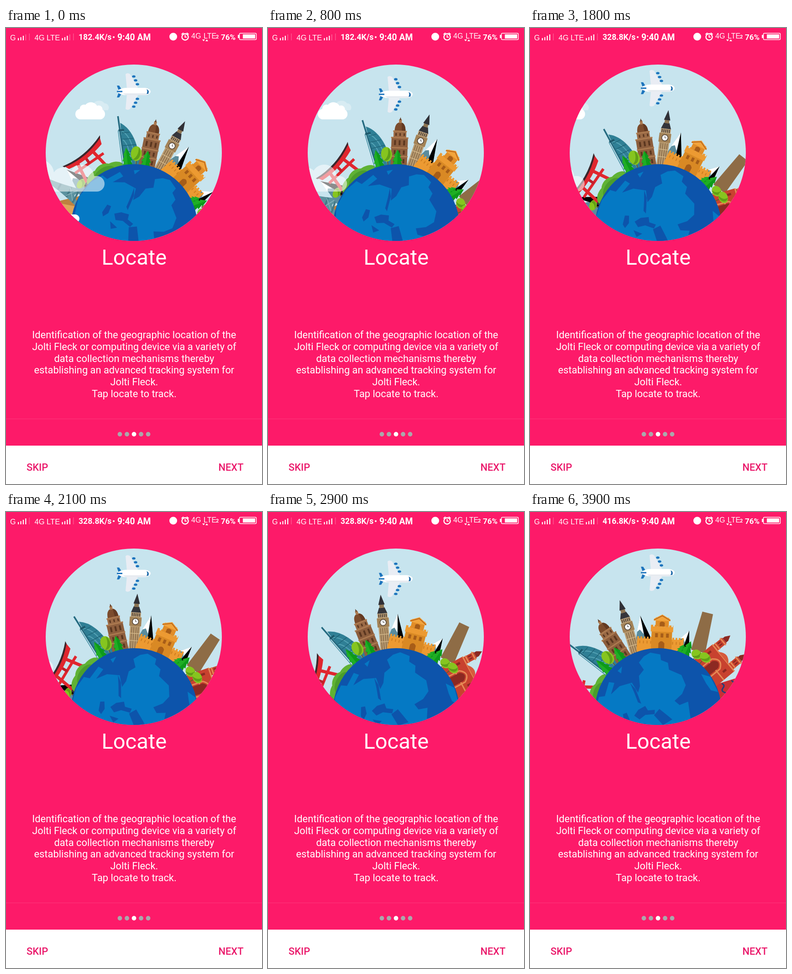
Recreate the animation shown at these times as an HTML page. Size 561 by 998 pixels, loop 4000 ms.

```html
<!DOCTYPE html>
<html lang="en">
<head>
<meta charset="utf-8">
<title>Locate</title>
<style>
html, body { margin: 0; width: 100%; height: 100%; overflow: hidden; background: #fd1a69; }
svg { display: block; width: 561px; height: 998px; }
text { font-family: Roboto, sans-serif; fill: #fff; }
.alt { font-family: "Liberation Sans", Arial, sans-serif; }
.bold { font-weight: 700; }
.btn { font-weight: 500; font-size: 21.9px; fill: #ea186a; }
</style>
</head>
<body>
<svg viewBox="0 0 561 998">
  <defs><clipPath id="disc"><circle cx="280" cy="273" r="193"/></clipPath></defs>
  <rect width="561" height="998" fill="#fd1a69"/>
  <g id="status"></g>
  <g clip-path="url(#disc)">
    <rect x="86" y="79" width="388" height="388" fill="#c7e4ee"/>
    <g id="backClouds" fill="#fff">
      <path d="M185 180a9 9 0 0 1 6-13 14 12 0 0 1 25-2 9 9 0 0 1 7 15z" opacity=".3"/>
      <rect x="152" y="177" width="65" height="23" rx="11.5"/>
      <circle cx="171" cy="177" r="9.5"/>
      <circle cx="186" cy="178" r="15.5"/>
      <circle cx="203" cy="178" r="8.5"/>
    </g>
    <g id="world"></g>
    <g id="frontClouds" fill="#fff">
      <path d="M40 358h159a17 17 0 0 0 0-34h-6a27 27 0 0 0-50-12 25 25 0 0 0-38 4 30 30 0 0 0-65 8z" opacity=".55"/>
      <rect x="60" y="408" width="101" height="19" rx="9.5"/>
    </g>
    <g id="plane"></g>
  </g>
  <g id="page"></g>
</svg>
<script>
const $ = id => document.getElementById(id);
const rect = (x, y, w, h, fill, more = '') => `<rect x="${x}" y="${y}" width="${w}" height="${h}" fill="${fill}" ${more}/>`;
const path = (d, fill, more = '') => `<path d="${d}" fill="${fill}" ${more}/>`;
const oval = (x, y, rx, ry, fill) => `<ellipse cx="${x}" cy="${y}" rx="${rx}" ry="${ry}" fill="${fill}"/>`;
const line = (d, color, w, more = '') => path(d, 'none', `stroke="${color}" stroke-width="${w}" ${more}`);
const text = (x, y, size, s, more = '') => `<text x="${x}" y="${y}" font-size="${size}" ${more}>${s}</text>`;
const dash = s => `stroke-dasharray="${s}"`;
// Stands a shape on the globe: angle from the top, ground at y = 0
const at = (angle, art, dx = 0) => `<g transform="rotate(${angle}) translate(${dx} -139)">${art}</g>`;

const pine = (a, h) => at(a,
  path(`M0 ${-h}L8 ${-h * .55}H5L11 ${-h * .22}H7L13 8H-13L-7 ${-h * .22}H-11L-5 ${-h * .55}H-8Z`, '#1fae24') +
  path(`M0 ${-h}L8 ${-h * .55}H5L11 ${-h * .22}H7L13 8H0Z`, '#0d9a1a'));

const tree = (a, h, rx, ry) => at(a,
  rect(-1, -h, 2, h + 4, '#6d5a2c') + oval(0, -h, rx, ry, '#86c51f') +
  path(`M${rx * .4} ${-h - ry * .9}A${rx} ${ry} 0 0 1 ${-rx * .6} ${-h + ry * .8}Q${rx * .5} ${-h + ry * .3} ${rx * .4} ${-h - ry * .9}`, '#5f9f17'));

const peak = (a, h, left, right) => at(a,
  path(`M0 ${-h}L${-left} 8H${right}Z`, '#5a8c9d') +
  path(`M0 ${-h}L${-left * .42} ${-h * .55}L${-left * .2} ${-h * .6}L0 ${-h * .45}Z`, '#fff') +
  path(`M0 ${-h}L${right} 8H${-right * .25}L1 ${-h * .4}Z`, '#000'));

function torii() {
  const red = '#e0262e';
  return at(-63.5,
    line('M-20-56L-29 4M20-56L29 4', red, 7) +
    line('M-30-2L-29 6M28-2L30 6', '#3a3036', 8) +
    line('M-38-33H38', red, 6) + rect(-3, -48, 6, 16, '#c01f2b') +
    path('M-49-60Q0-45 51-66L46-52Q0-39-44-48Z', red) +
    path('M-52-61Q0-49 54-70L51-65Q0-45-50-57Z', '#3a262c'));
}

function eiffel() {
  return at(-90,
    path('M-1-112H1Q4-50 20 4H10Q0-24-10 4H-20Q-4-50-1-112Z', '#5b929f') +
    line('M-17-6H17M-12-24H12M-7-48H7', '#447987', 4) +
    line('M-13-8L10-26M13-8L-10-26', '#8bb4bd', 1.5));
}

function sail() {
  return at(-33,
    path('M-13-92Q23-70 24 6H-12Z', '#2f7f95') +
    line('M-11-74Q12-60 14 0M-11-56Q3-44 5 0', '#55a3b5', 2) +
    line('M-12-14H22M-12-28H21M-12-42H18M-12-56H13M-12-70H5', '#1f6478', 1.5) +
    line('M-17-107L-10 4', '#246a80', 3.5) +
    rect(-18, -78, 12, 4, '#1d586b') + line('M-19-76L-15 0', '#3d8ba0', 1.5));
}

function dome() {
  const dark = '#5b3720', pale = '#ac7a50';
  return at(-17.2,
    rect(-18, -58, 36, 66, '#8d5e3d') + rect(-14, -72, 28, 15, '#9a6a46') +
    path('M-12-72Q-12-91 0-92Q12-91 12-72Z', '#7c4c2d') +
    path('M3-91Q12-88 12-72H4Z', '#643a22') +
    rect(-3, -98, 6, 8, pale) + path('M-2-97L0-103L2-97Z', dark) +
    line('M-19-58H19M-19-36H19M-19-17H19M-15-72H15', pale, 3) +
    line('M-10-65H11', dark, 6, dash('3 6')) +
    line('M-12-47H14', dark, 11, dash('4 6')) +
    line('M-12-26H14', dark, 9, dash('4 6')) +
    line('M-12-7H14', dark, 9, dash('4 6')));
}

function clockTower() {
  return at(-.6,
    rect(-11, -50, 22, 58, '#b99b70') +
    line('M-7-46V4M-2.5-46V4M2.5-46V4M7-46V4', '#806444', 1.5) +
    line('M-11-16H11M-11-32H11', '#d3b88b', 1.5) +
    rect(-13, -68, 26, 20, '#a38256') + oval(0, -58, 7.5, 7.5, '#4c4035') + oval(0, -58, 6, 6, '#fff') +
    line('M0-62V-58H3', '#333', 1) +
    rect(-11, -78, 22, 10, '#c0a176') + line('M-9-73H10', '#493f38', 7, dash('2 2')) +
    path('M-11-78L-6-91H6L11-78Z', '#35353a') + rect(-5, -98, 10, 8, '#8c7453') +
    path('M-7-97L0-119L7-97Z', '#303036'), -11);
}

function fort() {
  const main = '#ec9a32', shade = '#ce7d20', dark = '#a75d18';
  return at(18.5,
    rect(-53, -20, 102, 36, main) + line('M-53-21H49', main, 6, dash('4 3')) +
    line('M-48-12H46', shade, 6, dash('2 6')) +
    rect(-22, -42, 45, 52, '#d98924') + rect(-24, -47, 49, 11, main) +
    line('M-24-48H25', main, 5, dash('5 3')) +
    line('M-14-28H17', dark, 9, dash('6 6')) +
    path('M-6 8V-11Q0-20 7-11V8Z', dark) +
    rect(-14, -67, 29, 20, '#e18d28') + path('M-5-48V-56Q0-61 6-56V-48Z', dark) +
    path('M-18-64L0-74L18-64V-60H-18Z', '#f2a43c') + line('M-18-61L0-71L18-61', '#bd681c', 2));
}

function redGate() {
  const red = '#c8422f', dark = '#8c2922', pale = '#e58a55';
  const tower = x => rect(x - 8, -72, 16, 78, red) + line(`M${x - 10}-68H${x + 10}M${x - 9}-52H${x + 9}`, pale, 3) +
    path(`M${x - 6}-72V-78L${x}-89L${x + 6}-78V-72Z`, dark) + line(`M${x - 5}-60H${x + 6}`, dark, 8, dash('3 3'));
  return at(66.5,
    rect(-38, -46, 76, 60, red) + tower(-28) + tower(25) +
    line('M-38-46H38M-38-16H38', pale, 3) + path('M-17-46Q0-64 17-46Z', '#d65b3d') +
    path('M-10 8V-23Q0-39 10-23V8Z', dark) + line('M-14 8V-25Q0-45 14-25V8', pale, 3) +
    line('M-31-30H34', dark, 9, dash('5 47')));
}

function hall() {
  return at(89,
    rect(-20, -60, 46, 70, '#c92f35') +
    line('M-18-12q5-7 10 0t10 0 10 0 10 0M-18-34q5-7 10 0t10 0 10 0 10 0', '#253e78', 3));
}

function globe() {
  return oval(0, 0, 139, 139, '#0d54ab') + '<g transform="translate(-281 -437)">' +
    path('M142 437L150 395 165 370 178 372 195 345 206 350 192 372 215 360 243 360 250 385 258 372 262 350 276 340 270 322 284 312 300 308 320 318 318 330 331 340 329 355 352 374 355 398 342 414 322 424 330 436 350 434 345 470 280 576 160 500Z M394 384L412 395 419 432 405 424 399 407Z M220 327L232 320 226 334Z', '#0579c4') +
    path('M239 360L247 376 250 410 244 405 242 382Z M205 421L214 420 216 436 209 448 203 441Z M228 431L240 421 257 417 260 428 275 431 272 440 252 436 237 442Z M270 442L285 432 297 449 306 462 283 468Z M228 450L248 455 237 464Z', '#0d54ab') +
    '</g>';
}

$('world').innerHTML =
  at(-101, path('M0-45L-32 8H32Z', '#dfa45a') + path('M0-45L32 8H6Z', '#bd8140')) +
  eiffel() + peak(-78, 56, 26, 24) + tree(-79, 12, 12, 8) + torii() +
  [[-66, 16], [-57, 20], [-48, 15]].map(([a, r]) => at(a, oval(0, 3, 24, r, '#5fb234'))).join('') +
  at(-60, oval(6, 6, 26, 15, '#4b9d2c')) +
  sail() + dome() + pine(-34.5, 37) + tree(-27, 23, 12, 16) + pine(-18.5, 32) +
  peak(5.4, 75, 32, 22) + clockTower() + peak(37, 51, 28, 22) + fort() +
  at(30, path('M-12-97H12L16-10H-16Z', '#8e6c46'), 53) +
  hall() + redGate() + pine(37, 18) + pine(41, 31) +
  tree(50, 12, 12, 10) + tree(57, 18, 13, 10) + globe();

const blue = '#1d74bd';
const wing = path('M265-5L262-38Q266-42 272-38L291-5Z', '#e9edf4') +
  [0, 1, 2].map(i => oval(280 + i * 4, -33 + i * 8.5, 3.8, 2.6, blue)).join('') +
  path('M247-2L243-13H248L255-2Z', blue);
$('plane').innerHTML = wing + `<g transform="scale(1 -1)">${wing}</g>` +
  path('M243 0Q248-7 262-8H305Q317-6 317 0T305 8H262Q248 7 243 0Z', '#fff') +
  path('M256 4H312Q309 8 305 8H262Z', '#e6eaf0') +
  path('M308-5Q315-3 312 5H308Q311 0 308-5Z', '#1766a8') + rect(243, -1.5, 12, 3, blue);

const bars = x => [5, 7, 10, 13].map((h, i) =>
  rect(x + i * 5.4, 27 - h, 2.2, h, '#fff', i === 3 ? 'class="last"' : '')).join('') +
  rect(x + 24.5, 12, 1.5, 15, '#fff', 'opacity=".25"');

$('status').innerHTML =
  text(9, 27, 16, 'G', 'class="alt"') + bars(26) +
  text(62.5, 27, 16.5, '4G LTE', 'class="alt"') + bars(122.5) +
  text(159, 26, 17.6, '', 'class="bold" id="speed"') + oval(236, 20, 2, 2, '#fff') +
  text(244, 27, 19.3, '9:40 AM', 'class="bold"') +
  oval(366.5, 19, 8.5, 8.5, '#fff') +
  '<circle cx="392.5" cy="19.5" r="7" fill="none" stroke="#fff" stroke-width="2.4"/>' +
  line('M392.5 15V20H396M384.5 14L389 10.5M400.5 14L396 10.5', '#fff', 2) +
  text(406, 23, 16, '4G', 'class="alt"') + text(433, 23, 16, 'LTE', 'class="alt"') +
  text(460, 23, 11, '2', 'class="bold"') +
  path('M430 25H436L433 29Z M437 29H443L440 25Z', '#fff') +
  text(471, 26, 17, '76%', 'class="bold"') +
  rect(511.5, 11.5, 37, 14, 'none', 'rx="2" stroke="#fff" stroke-width="1.5"') +
  rect(519, 14, 27, 9, '#fff') + rect(508, 15, 3, 7, '#fff');

const copy = [
  'Identification of the geographic location of the',
  'Jolti Fleck or computing device via a variety of',
  'data collection mechanisms thereby',
  'establishing an advanced tracking system for',
  'Jolti Fleck.',
  'Tap locate to track.'
];
const mid = 'text-anchor="middle"';
$('page').innerHTML =
  text(280.8, 518, 47, 'Locate', mid) +
  copy.map((s, i) => text(280.9, 679 + i * 25.75, 21.83, s, mid)).join('') +
  rect(0, 855, 561, 1, '#fff', 'opacity=".12"') +
  [0, 1, 2, 3, 4].map(i => oval(249.5 + i * 15.5, 889, 4.9, 5, i === 2 ? '#fff' : '#aaa8ac')).join('') +
  rect(0, 914, 561, 84, '#fff') +
  text(45, 969, 21.9, 'SKIP', 'class="btn"') +
  text(520.5, 969, 21.9, 'NEXT', 'class="btn" text-anchor="end"');

const LOOP = 4000, STEP = 100;
const speeds = [[3700, '416.8K/s'], [1000, '328.8K/s'], [0, '182.4K/s']];
const lastBars = document.querySelectorAll('.last');
const start = performance.now();

function draw(ms) {
  const t = ms / 1000;
  $('world').setAttribute('transform', `translate(281 437) rotate(${(2.5 - t) * 11.45})`);
  $('plane').setAttribute('transform', `translate(0 ${139 + 7.3 * Math.sin(t * 2 * Math.PI / 2.35)})`);
  for (const id of ['backClouds', 'frontClouds'])
    $(id).setAttribute('transform', `translate(${-53.5 * t} 0)`);
  $('speed').textContent = speeds.find(([from]) => ms >= from)[1];
  for (const bar of lastBars) bar.setAttribute('opacity', ms < 1000 ? .25 : 1);
}

function tick() {
  const ms = Math.max(0, performance.now() - start) % LOOP;
  draw(Math.floor(ms / STEP) * STEP);
  requestAnimationFrame(tick);
}
tick();
</script>
</body>
</html>
```
